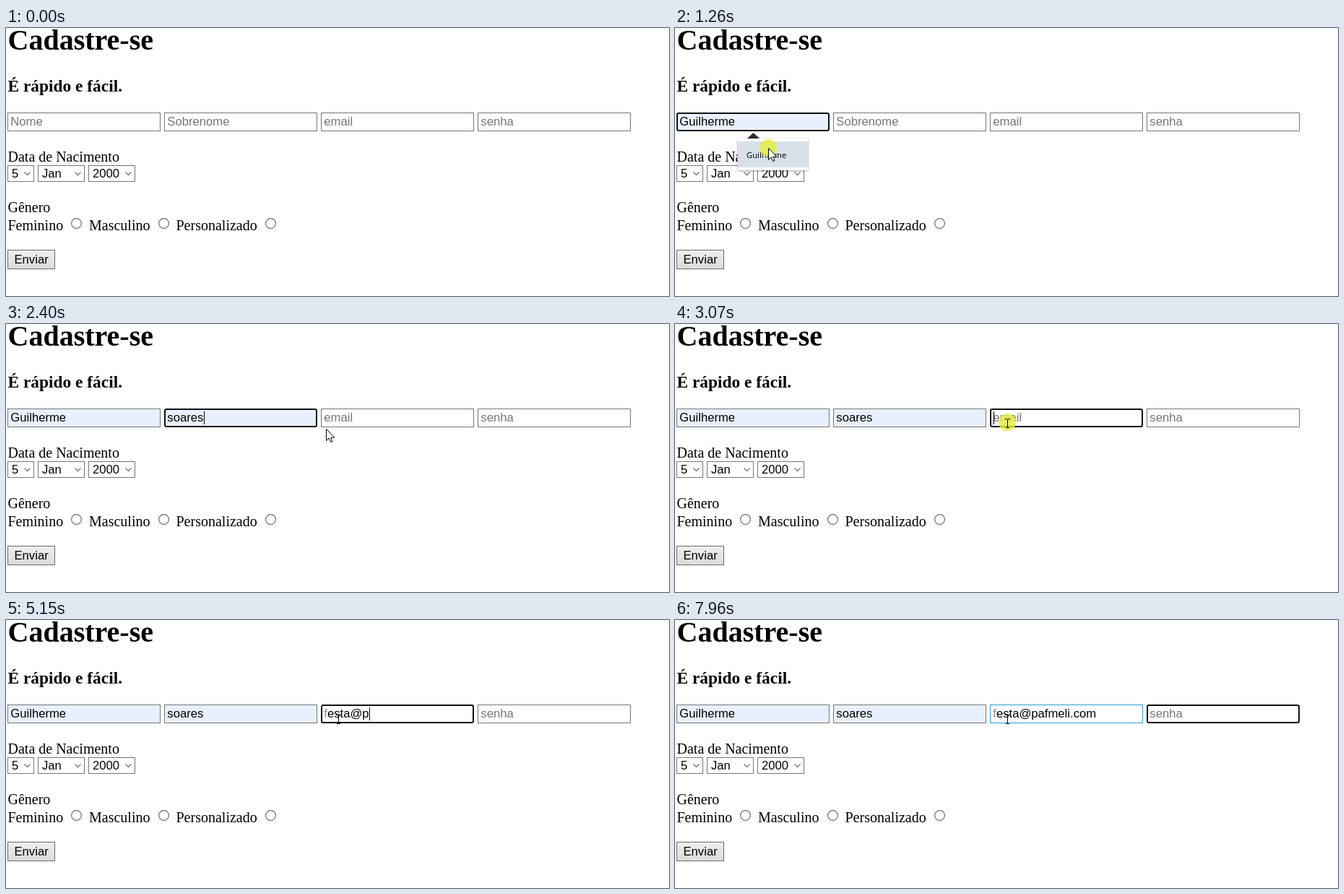
These frames come from a looping animation (918 px wide and 371 px high, 8 s). An HTML page:

```html
<!DOCTYPE html>
<html lang="pt">
<head>
<meta charset="utf-8">
<style>
html, body { margin: 0; width: 100%; height: 100%; overflow: hidden; background: #fff; }
svg { display: block; }
text { font: 20px "Liberation Serif", serif; }
.ui { font: 16.667px "Liberation Sans", sans-serif; }
.tip { font: 11.25px "Open Sans", sans-serif; }
.title { font-size: 40px; font-weight: bold; }
.sub { font-size: 23.4px; font-weight: bold; }
</style>
</head>
<body>
<svg width="918" height="371" viewBox="0 0 918 371">
  <defs>
    <linearGradient id="btn" x2="0" y2="1">
      <stop stop-color="#efefef"/><stop offset="1" stop-color="#dadada"/>
    </linearGradient>
    <filter id="shade" x="-20%" y="-20%" width="140%" height="150%">
      <feDropShadow dx="0" dy="1" stdDeviation="1.5" flood-opacity=".4"/>
    </filter>
  </defs>
  <g id="page"></g>
  <g id="live"></g>
</svg>
<script>
const LOOP = 8000, STEP = 1000 / 15, BLINK = 530, LEFT = 2.5;
const $ = id => document.getElementById(id);
const pen = document.createElement('canvas').getContext('2d');
pen.font = '16.667px "Liberation Sans", sans-serif';

const text = (x, y, s, cls = '', fill = '#000') =>
  `<text x="${x}" y="${y}" class="${cls}" fill="${fill}">${s}</text>`;
const box = (x, y, w, h, fill, stroke) =>
  `<rect x="${x + .5}" y="${y + .5}" width="${w - 1}" height="${h - 1}" fill="${fill}" stroke="${stroke}"/>`;
const select = (x, w, s) => box(x, 190, w, 23, '#fff', '#767676') + text(x + 6, 207, s, 'ui') +
  `<path d="M${x + w - 13.5} 199.5l4 4 4-4" fill="none" stroke="#777" stroke-width="1.3"/>`;
const radio = (x, s, cx) => text(x, 280, s) +
  `<circle cx="${cx}" cy="270.5" r="6.9" fill="#fff" stroke="#6b6b6b" stroke-width="1.2"/>`;

$('page').innerHTML =
  text(LEFT, 30, 'Cadastre-se', 'title') +
  text(LEFT, 88, 'É rápido e fácil.', 'sub') +
  text(LEFT, 185, 'Data de Nacimento') +
  select(2, 37, '5') + select(44, 65, 'Jan') + select(114, 65, '2000') +
  text(LEFT, 255, 'Gênero') +
  radio(LEFT, 'Feminino', 97.5) + radio(115, 'Masculino', 218.5) + radio(235.5, 'Personalizado', 366.5) +
  box(2, 307, 66, 27, 'url(#btn)', '#6b6b6b') + text(11.5, 326, 'Enviar', 'ui');

// A run adds its letters to a base text, the first at once and the last after `span` ms.
const runs = [
  { start: 3200, span: 540, power: 2, base: '', add: 'fesa' },
  { start: 4550, span: 410, power: 2.6, base: 'fes', add: 'ta@' },
  { start: 5150, span: 1010, power: 1, base: 'festa@', add: 'pafmeli.com' }
];
const keys = runs.flatMap(r => [...r.add].map((_, i) => ({
  at: r.start + r.span * (i / (r.add.length - 1)) ** r.power,
  value: r.base + r.add.slice(0, i + 1)
})));

// The suggestions open after focus, preview on hover and close when one is taken.
const fields = [
  { hint: 'Nome', focus: 600, hover: 1130, close: 1330, width: 97, items: ['Guilherme'] },
  { hint: 'Sobrenome', focus: 1600, hover: 2060, close: 2270, width: 72, items: ['soares', 'Soares'] },
  { hint: 'email', focus: 3070, close: 3200, width: 226, keys,
    items: ['festa', 'baile', 'cadastro.novo', 'noite'].map(s => s + '@pafmeli.com') },
  { hint: 'senha', focus: 6360 }
];
fields.forEach((f, i) => {
  f.x = 2 + 217 * i;
  f.blur = fields[i + 1]?.focus ?? LOOP;
  f.keys ??= f.hover ? [{ at: f.hover, value: f.items[0] }] : [];
});
const clicks = [600, 1260, 1600, 2200, 3070];

// [start, end, x, y]
const moves = [[67, 467, 130, 130], [933, 1267, 129, 166], [1267, 1467, 262, 132],
  [1600, 2133, 327, 175], [2267, 2400, 443, 145], [2400, 2600, 460, 136]];

// The pointer is seen 15 times a second; it sets off sideways late.
function pointer(t) {
  const q = Math.floor((t + 8) / STEP) * STEP + .5;
  if (q < moves[0][0]) return null;
  let x = 725, y = 318;
  for (const [start, end, toX, toY] of moves) {
    const k = Math.min(1, Math.max(0, (q - start) / (end - start)));
    x += (toX - x) * k ** 3;
    y += (toY - y) * k;
  }
  return [Math.round(x), Math.round(y)];
}

const over = (p, f) => p && p[1] >= 117 && p[1] < 143 && p[0] >= f.x && p[0] < f.x + 212;

function caret(f, value, t) {
  const acts = [f.focus, f.close, ...(f.hover ? [] : f.keys.map(k => k.at))];
  const since = Math.max(...acts.filter(a => a <= t));
  if (Math.floor((t - since) / BLINK) % 2) return '';
  const x = Math.round(f.x + 4.8 + pen.measureText(value).width);
  return `<rect x="${x}" y="121" width="1" height="18"/>`;
}

function field(f, t, p) {
  const { x } = f, value = f.keys.filter(k => k.at <= t).pop()?.value ?? '';
  const focused = t >= f.focus && t < f.blur;
  const fill = f.hover && value ? '#e8f0fe' : '#fff';
  const frame = focused
    ? `<rect x="${x + 1}" y="118" width="210" height="24" rx="2" fill="${fill}" stroke="#101010" stroke-width="2"/>`
    : box(x, 117, 212, 26, fill, over(p, f) ? '#2a9fd6' : '#767676');
  const shown = f.keys === keys && value
    ? `<tspan fill="#94858c">${value[0]}</tspan>${value.slice(1)}` : value;
  return frame + text(x + 4.3, 135, shown || f.hint, 'ui', value ? '#000' : '#757575') +
    (focused ? caret(f, value, t) : '');
}

function popup(f, t) {
  if (!f.items || t < f.focus + 60 || t >= f.close) return '';
  const mid = f.x + 106.5, x = mid - 21.5;
  return `<path d="M${mid - 9} 153.5l9-8.5 9 8.5z" fill="#2b2b30"/>` +
    `<rect x="${x}" y="153" width="${f.width}" height="${f.items.length * 36 + 8}" rx="3" fill="#fff" filter="url(#shade)"/>` +
    (t >= f.hover ? `<rect x="${x}" y="157" width="${f.width}" height="36" fill="#d8e1e9"/>` : '') +
    f.items.map((s, n) => text(x + 12, 180 + 36 * n, s, 'tip')).join('');
}

function cursor(p, t) {
  if (!p) return '';
  const halo = clicks.some(c => t >= c && t < c + 66)
    ? '<circle r="12" fill="#e6ee3c" opacity=".8"/>' : '';
  const shape = fields.some(f => over(p, f))
    ? '<path d="M-3 -4.5h2.5l1 1 1-1h2.5M.5 -4v11M-2 7.5h5" fill="none" stroke="#000"/>'
    : '<path d="M.5 .5v16l3.7-3.5 2.5 5.6 2.4-1-2.4-5.4h5.1z" fill="#fff" stroke="#000"/>';
  return `<g transform="translate(${p})">${halo}${shape}</g>`;
}

function draw() {
  const t = performance.now() % LOOP, p = pointer(t);
  $('live').innerHTML = fields.map(f => field(f, t, p)).join('') +
    fields.map(f => popup(f, t)).join('') + cursor(p, t);
  requestAnimationFrame(draw);
}
draw();
</script>
</body>
</html>
```
